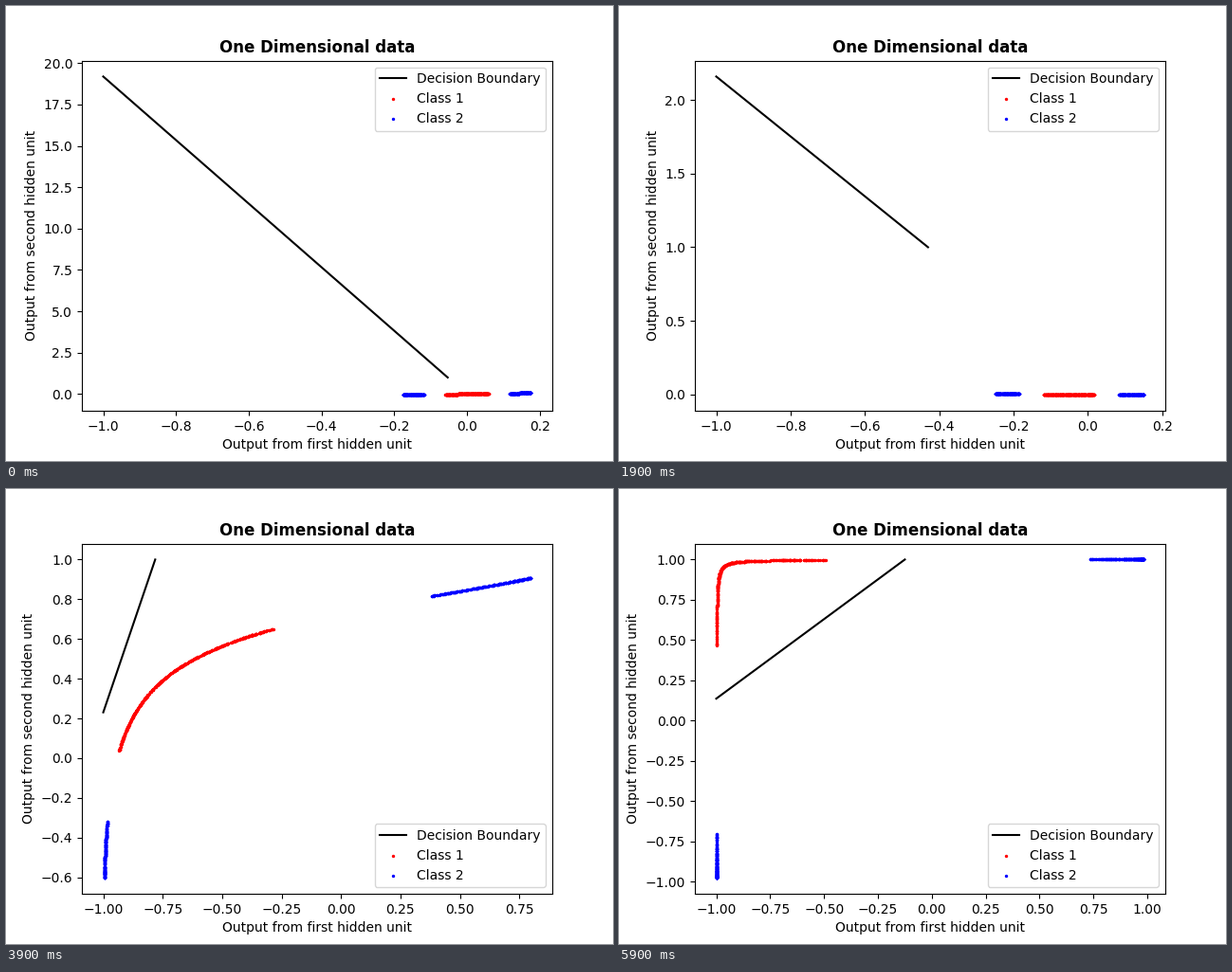
Animation of 640 by 480 pixels, one loop 6 s. Source, as a matplotlib script:

```python
import numpy as np
import matplotlib.pyplot as plt
from matplotlib.animation import FuncAnimation

FRAMES = 60
INTERVAL = 100
BREAK = 35  # frame at which the hidden units start to grow quickly

# key points of the boundary: x where y = 1, and 1 / y where x = -1
KEY_T = [0, 8, 19, 26, 30.5, 35, 43, 59]
KEY_X = [-0.053, -0.224, -0.43, -0.612, -1, -1.32, -0.243, -0.125]
KEY_INV_Y = [0.0521, 0.23, 0.463, 0.726, 1, 3.906, 4.76, 7.35]


def grow(t, start, end, half):
    """Saturating growth after BREAK; `half` sets how soon it slows down."""
    def hill(p):
        return p * p / (p * p + half * half)
    return start + (end - start) * hill(max(t - BREAK, 0)) / hill(FRAMES - 1 - BREAK)


def hidden_units(t):
    """Weight and bias of both hidden units during training."""
    s = min(t / BREAK, 1)
    burst = s ** 10
    w1 = 0.0592 + 0.028 * s ** 2 + 0.1053 * burst
    b1 = -0.171 * s ** 2 - 0.223 * burst
    w2 = 0.023 * np.exp(-7 * 5 * s / 7) - 0.003 + 0.0217 * burst
    b2 = -0.0145 * burst
    return ((grow(t, w1, 1.48, 5.2), grow(t, b1, -2.02, 5.5)),
            (grow(t, w2, 1.38, 7.2), grow(t, b2, 1.887, 8.0)))


def boundary(t):
    x_top = np.interp(t, KEY_T, KEY_X)
    y_left = 1 / np.interp(t, KEY_T, KEY_INV_Y)
    return [-1, x_top], [y_left, 1]


def sample(low, high, count):
    return np.append(rng.uniform(low, high, count), [low, high])


rng = np.random.default_rng(4)
class1 = sample(-1, 1, 500)
class2 = np.append(sample(-3, -2, 250), sample(2, 3, 250))

fig, ax = plt.subplots(figsize=(6.4, 4.8), dpi=100)


def draw(frame):
    ax.clear()
    ax.plot(*boundary(frame), color="black", label="Decision Boundary")
    units = hidden_units(frame)
    for x, color, name in ((class1, "red", "Class 1"), (class2, "blue", "Class 2")):
        outputs = [np.tanh(w * x + b) for w, b in units]
        ax.scatter(*outputs, s=2, color=color, label=name)
    ax.set_title("One Dimensional data", fontweight="bold")
    ax.set_xlabel("Output from first hidden unit")
    ax.set_ylabel("Output from second hidden unit")
    ax.legend(loc="best")
    return ax.get_children()


anim = FuncAnimation(fig, draw, frames=FRAMES, interval=INTERVAL,
                     init_func=lambda: draw(0), repeat=True, repeat_delay=0)
plt.show()
```
